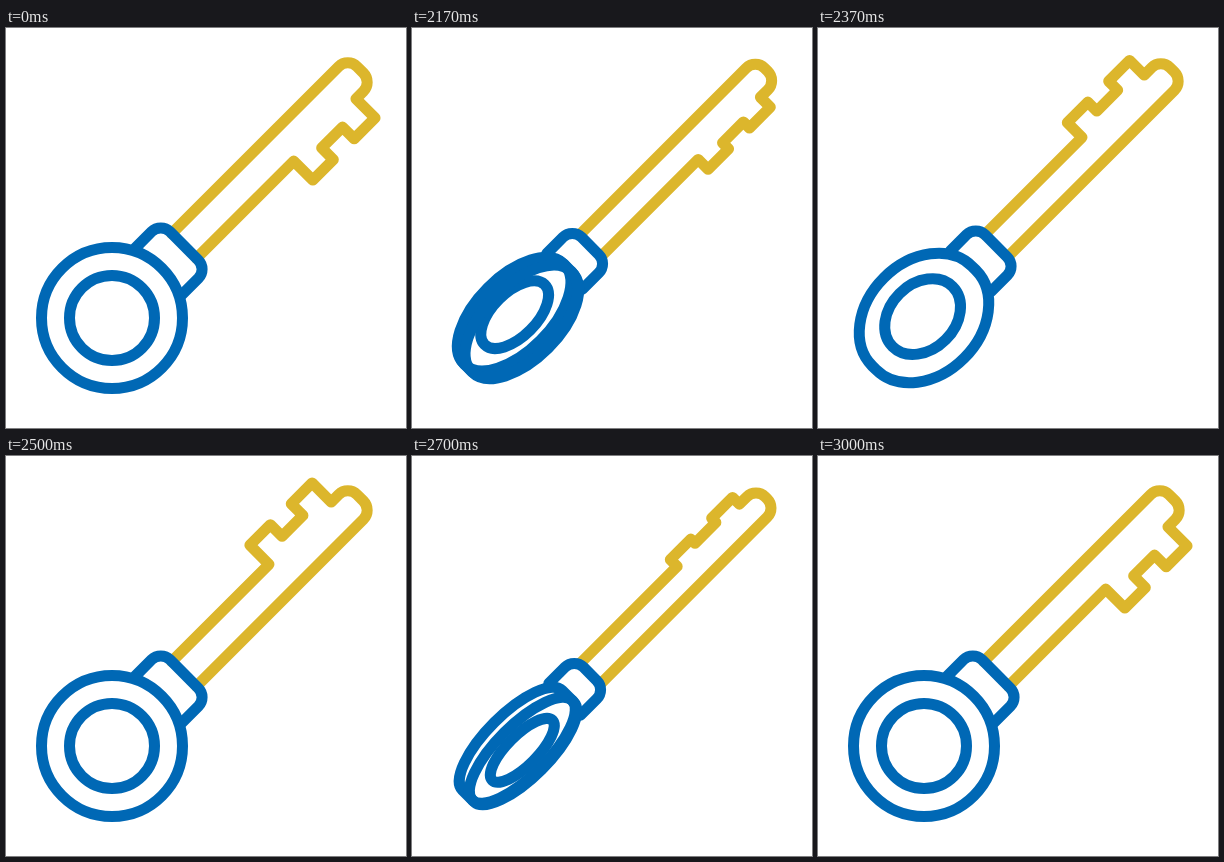
Animation of 400x400 px, one loop 3020 ms. Source, as an HTML page with a canvas:

```html
<!DOCTYPE html>
<html lang="en">
<head>
<meta charset="utf-8">
<title>Turning key</title>
<style>
html, body { margin: 0; width: 100%; height: 100%; overflow: hidden; background: #fff; }
canvas { display: block; }
</style>
</head>
<body>
<canvas id="stage" width="400" height="400"></canvas>
<script>
const ctx = document.getElementById('stage').getContext('2d');
const LOOP = 3020, REST = 2020, STEP = 25, STEPS = 40;
const GOLD = '#dcb62c', BLUE = '#0068b5';
const DEPTH = 10, COLLAR_DEPTH = 13;
const OUTER = 70.5, INNER = 42.5;

// Points are [distance along the key, distance from its axis].
const TEETH = [
  [327.5, 17.5], [327.5, 44.5], [298, 44.5], [298, 28],
  [268.5, 28], [268.5, 44.5], [239.5, 44.5], [239.5, 17.5], [102, 17.5]
];

function stroke(color, draw) {
  ctx.strokeStyle = color;
  ctx.beginPath();
  draw();
  ctx.stroke();
}

// Half ellipses pushed apart by the visible thickness.
function ring(radius, squash, shift, gap = 0) {
  const b = radius * squash;
  stroke(BLUE, () => {
    ctx.ellipse(0, shift + gap, radius, b, 0, 0, Math.PI);
    ctx.ellipse(0, shift - gap, radius, b, 0, Math.PI, 2 * Math.PI);
    ctx.closePath();
  });
}

// Round-cornered end shared by the blade and the collar.
function roundEnd(start, end, low, high, radius) {
  const r = Math.min(radius, Math.abs(high - low) / 2);
  ctx.moveTo(start, low);
  ctx.arcTo(end, low, end, high, r);
  ctx.arcTo(end, high, start, high, r);
}

function drawKey(angle) {
  const c = Math.cos(angle), edge = Math.sin(angle) ** 3;
  const facing = c < 0 ? -1 : 1, squash = Math.abs(c);
  const turn = (v, depth) => v * c + Math.sign(v) * facing * depth * Math.abs(edge);

  ctx.setTransform(1, 0, 0, 1, 0, 0);
  ctx.clearRect(0, 0, 400, 400);
  ctx.translate(106, 290);
  ctx.rotate(-Math.PI / 4);
  ctx.lineWidth = 11;
  ctx.lineJoin = ctx.lineCap = 'round';

  stroke(GOLD, () => {
    roundEnd(102, 351, turn(-17.5, DEPTH), turn(17.5, DEPTH), 13);
    for (const [u, v] of TEETH) ctx.lineTo(u, turn(v, DEPTH));
  });

  stroke(BLUE, () => {
    const low = turn(-33, COLLAR_DEPTH), high = turn(33, COLLAR_DEPTH);
    roundEnd(66, 102, low, high, 13);
    ctx.lineTo(66, high);
  });

  const shift = -0.75 * DEPTH * edge;
  ring(OUTER, squash, 0, DEPTH * Math.abs(edge));
  ring(INNER, squash, shift);
  // Rims show once the bow is nearly edge-on, the far one only from the front.
  if (squash < 0.55) {
    ring(OUTER, squash, shift);
    if (facing > 0) ring(OUTER, squash, -shift);
  }
}

function frame(now) {
  const t = now % LOOP;
  const step = t < REST ? 0 : Math.min(STEPS, Math.floor((t - REST) / STEP) + 1);
  const turn = step / STEPS * 2 * Math.PI;
  // Lingers slightly whenever the key lies flat.
  drawKey(turn - 0.09 * Math.sin(2 * turn));
  requestAnimationFrame(frame);
}
requestAnimationFrame(frame);
</script>
</body>
</html>
```
